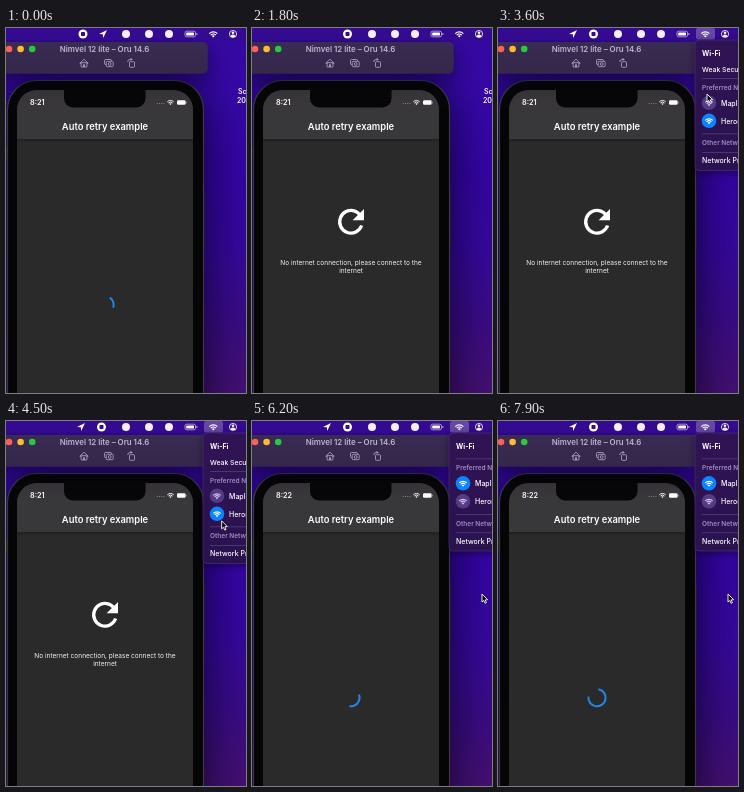
An HTML page with a canvas for the animation above (8000 ms loop, 240 px wide and 365 px high).

```html
<!DOCTYPE html>
<html lang="en">
<head>
<meta charset="utf-8">
<title>Auto retry example</title>
<style>
html, body { margin: 0; width: 100%; height: 100%; overflow: hidden; background: #330795; }
canvas { display: block; width: 240px; height: 365px; }
</style>
</head>
<body>
<canvas id="stage"></canvas>
<script>
const W = 240, H = 365, LOOP = 8000, TAU = Math.PI * 2;
const canvas = document.getElementById('stage');
const ctx = canvas.getContext('2d');
const dpr = Math.max(1, window.devicePixelRatio || 1);
canvas.width = W * dpr;
canvas.height = H * dpr;

// Moments of change, in ms
const T = { fail: 500, menu: 2950, join: 4700, minute: 4550, retry: 5980 };

function box(x, y, w, h, r, fill, stroke, lw = 1) {
  ctx.beginPath();
  ctx.roundRect(x, y, w, h, r);
  if (fill) { ctx.fillStyle = fill; ctx.fill(); }
  if (stroke) { ctx.strokeStyle = stroke; ctx.lineWidth = lw; ctx.stroke(); }
}

function shadowBox(x, y, w, h, r, fill, blur, alpha, dy = 0) {
  ctx.save();
  ctx.shadowColor = `rgba(4,0,24,${alpha})`;
  ctx.shadowBlur = blur * dpr;
  ctx.shadowOffsetY = dy * dpr;
  box(x, y, w, h, r, fill);
  ctx.restore();
}

function dot(x, y, r, fill) {
  ctx.beginPath();
  ctx.arc(x, y, r, 0, TAU);
  ctx.fillStyle = fill;
  ctx.fill();
}

function arc(x, y, r, a, b, color, lw) {
  ctx.beginPath();
  ctx.arc(x, y, r, a, b);
  ctx.strokeStyle = color;
  ctx.lineWidth = lw;
  ctx.stroke();
}

function poly(points, fill, stroke, lw = 1) {
  ctx.beginPath();
  points.forEach(([x, y]) => ctx.lineTo(x, y));
  ctx.closePath();
  if (fill) { ctx.fillStyle = fill; ctx.fill(); }
  if (stroke) { ctx.strokeStyle = stroke; ctx.lineWidth = lw; ctx.stroke(); }
}

function text(s, x, y, size, color = '#fff', weight = 400, align = 'left') {
  ctx.font = `${weight} ${size}px Inter, "Open Sans", sans-serif`;
  ctx.textAlign = align;
  ctx.textBaseline = 'alphabetic';
  ctx.fillStyle = color;
  ctx.fillText(s, x, y);
}

function fade(x0, y0, x1, y1, colors) {
  const g = ctx.createLinearGradient(x0, y0, x1, y1);
  colors.forEach((c, i) => g.addColorStop(i / (colors.length - 1), c));
  return g;
}

// Fan of arcs standing on (x, y)
function wifi(x, y, r, color = '#fff') {
  const a = -Math.PI * 0.75, b = -Math.PI * 0.25;
  for (const k of [0.92, 0.58]) arc(x, y, r * k, a, b, color, r * 0.19);
  ctx.beginPath();
  ctx.moveTo(x, y);
  ctx.arc(x, y, r * 0.34, a, b);
  ctx.fillStyle = color;
  ctx.fill();
}

const clamp = x => Math.min(1, Math.max(0, x));
const smooth = x => x * x * (3 - 2 * x);

// Cubic bezier (.4, 0, .2, 1)
function ease(x) {
  if (x <= 0) return 0;
  if (x >= 1) return 1;
  let lo = 0, hi = 1, s = 0.5;
  for (let i = 0; i < 24; i++) {
    s = (lo + hi) / 2;
    const q = 1 - s;
    if (1.2 * q * q * s + 0.6 * q * s * s + s * s * s < x) lo = s; else hi = s;
  }
  return 3 * (1 - s) * s * s + s * s * s;
}

function desktop() {
  ctx.fillStyle = fade(0, 0, 0, H, ['#3509a0', '#3407a6', '#3304a2', '#34079a', '#380b84', '#431070']);
  ctx.fillRect(0, 0, W, H);
}

function recordIcon(x) {
  dot(x, 6, 4.5, '#fff');
  box(x - 2, 4, 4, 4, 0.8, '#320a90');
}

function arrowIcon(x) {
  poly([[x + 4, 2], [x - 4, 6], [x - 0.2, 6.3], [x + 0.2, 10]], '#fff');
}

function menuBar(t) {
  ctx.fillStyle = '#340a90';
  ctx.fillRect(0, 0, W, 11.5);
  // The arrow fades out, then its neighbour closes the gap
  recordIcon(77 + 18.5 * smooth(clamp((t - 200) / 250)));
  ctx.globalAlpha = 1 - clamp((t - 50) / 200);
  arrowIcon(97);
  ctx.globalAlpha = 1;
  if (t >= T.menu) arrowIcon(75);
  for (const x of [120, 143, 163]) dot(x, 6, 4, '#f4effb');
  box(179, 3.2, 10.5, 5.6, 1.6, null, '#c5b4e2', 0.8);
  box(180.2, 4.4, 7.8, 3.2, 0.7, '#fff');
  box(190.4, 5, 1, 2, 0.5, '#c5b4e2');
  if (t >= T.menu) box(198, 0, 19, 11.5, 2, '#6648a4');
  wifi(207.3, 9.6, 6.2);
  arc(227, 6, 3.6, 0, TAU, '#fff', 0.8);
  dot(227, 4.8, 1.3, '#fff');
  ctx.beginPath();
  ctx.arc(227, 9, 2.5, Math.PI, TAU);
  ctx.fill();
}

function titleBar() {
  shadowBox(-10, 14, 211.5, 31.5, 5, '#35284c', 24, 0.6, 5);
  box(-10, 14, 211.5, 31.5, 5, fade(0, 14, 0, 46, ['#392b52', '#34274a']));
  dot(3, 21, 3.3, '#ff5f57');
  dot(14.6, 21, 3.3, '#febc2e');
  dot(26.2, 21, 3.3, '#28c840');
  text('Nimvel 12 lite – Oru 14.6', 98.5, 23.8, 7.9, '#bfb5cc', 600, 'center');

  const c = '#b5aac5', lw = 0.8;
  poly([[73.8, 35.3], [78, 31.2], [82.2, 35.3]], null, c, lw);
  box(75.1, 34.7, 5.8, 4.3, 0.3, '#37274e', c, lw);
  box(77.2, 36.2, 1.6, 2.8, 0, c);
  box(98.5, 31.5, 7, 5, 1, null, c, lw);
  box(100.2, 33.3, 7, 5.4, 1, '#37274e', c, lw);
  arc(103.7, 36, 1.4, 0, TAU, c, lw);
  box(123.5, 33.7, 5, 5.6, 0.8, null, c, lw);
  arc(124.3, 34, 2.6, -Math.PI, -Math.PI * 0.45, c, lw);
  poly([[124.5, 30], [126.8, 31.4], [124.5, 32.8]], c);
}

function phone(t) {
  shadowBox(1.5, 52.5, 196, 400, 29, '#050506', 46, 0.85, 6);
  box(196.5, 162, 2.3, 58, 1, '#211e2e');
  box(0, 118, 2, 13, 1, '#211e2e');
  box(1.5, 52.5, 196, 400, 29, '#050506', '#3a3940', 1.2);

  ctx.save();
  ctx.beginPath();
  ctx.roundRect(11, 62, 176, 400, 20);
  ctx.clip();
  ctx.fillStyle = '#2b2a2b';
  ctx.fillRect(11, 62, 176, 303);
  ctx.fillStyle = fade(0, 110, 0, 115, ['#1d1d1d', '#2b2a2b']);
  ctx.fillRect(11, 110, 176, 5);
  ctx.fillStyle = '#383739';
  ctx.fillRect(11, 62, 176, 49);
  ctx.restore();

  box(58, 58, 81.5, 21.5, [0, 0, 9, 9], '#050506');
  text(t < T.minute ? '8:21' : '8:22', 24, 76.8, 7.3, '#fff', 600);
  for (let i = 0; i < 4; i++) dot(151.3 + i * 2.2, 75.5, 0.6, '#8a898c');
  wifi(164.5, 77, 4.9);
  box(171, 72.3, 8.6, 4.4, 1.2, '#fff');
  box(180, 73.6, 0.7, 1.8, 0.3, '#aaa');
  text('Auto retry example', 99, 101.5, 9.4, '#fff', 600, 'center');

  if (t < T.fail) spinner(t + 178, -0.12);
  else if (t < T.retry) failure();
  else spinner(t - T.retry, 0.32);
}

function failure() {
  arc(99, 193.8, 11.3, 0.34, TAU - 0.72, '#fff', 3.3);
  poly([[112, 180.9], [112, 192.3], [100.6, 192.3]], '#fff');
  text('No internet connection, please connect to the', 99, 237.3, 6.56, '#f2f2f2', 400, 'center');
  text('internet', 99, 245.3, 6.56, '#f2f2f2', 400, 'center');
}

// Head runs ahead in the first half of a cycle, tail catches up in the second
function spinner(age, turn) {
  const p = (age % 1333) / 1333;
  const head = ease(p * 2), tail = ease(p * 2 - 1);
  const start = -Math.PI / 2 + tail * 1.5 * Math.PI + p * Math.PI / 2 + (age / 2222) * TAU + turn;
  const sweep = Math.max((head - tail) * 1.5 * Math.PI, 0.001);
  arc(99, 276.7, 8.6, start, start + sweep, '#2385e6', 2.1);
}

function network(name, y, on) {
  dot(211, y, 7.3, on ? '#0a84ff' : '#553b86');
  wifi(211, y + 3.4, 5.8, on ? '#fff' : '#d4c8e8');
  text(name, 223, y + 2.7, 7, '#fff', 500);
}

function wifiMenu(t) {
  if (t < T.menu) return;
  const joined = t >= T.join, d = joined ? -12.5 : 0;
  const line = y => { ctx.fillStyle = '#58457c'; ctx.fillRect(204, y, 36, 0.7); };
  shadowBox(197, 12, 60, 130.5 + d, 4, '#2d124f', 8, 0.5, 2);
  box(197, 12, 60, 130.5 + d, 4, fade(0, 12, 0, 142, ['#301354', '#2a124f']), '#503575', 0.6);
  text('Wi-Fi', 204, 28, 7, '#fff', 700);
  if (!joined) text('Weak Security', 204, 43.7, 6.8, '#fff', 500);
  line(50 + d);
  text('Preferred Network', 204, 61.8 + d, 6.5, '#9f8cc4', 600);
  network('Maple Den', 74.8 + d, joined);
  network('Heron', 92.8 + d, !joined);
  line(105.5 + d);
  text('Other Networks', 204, 117 + d, 6.5, '#9f8cc4', 600);
  line(124 + d);
  text('Network Preferences…', 204, 135 + d, 7, '#fff', 500);
}

// Stops of the pointer: time, x, y
const stops = [[1900, 246, 70], [2600, 207, 9], [3000, 207, 9], [3550, 209, 66], [4200, 209, 66], [5000, 230, 173]];

function pointer(t) {
  if (t < stops[0][0]) return;
  let [, x, y] = stops[stops.length - 1];
  for (let i = 1; i < stops.length; i++) {
    const [t0, x0, y0] = stops[i - 1], [t1, x1, y1] = stops[i];
    if (t < t1) {
      const k = smooth((t - t0) / (t1 - t0));
      x = x0 + (x1 - x0) * k;
      y = y0 + (y1 - y0) * k;
      break;
    }
  }
  const shape = [[0, 0], [0, 8], [1.8, 6.4], [3.1, 9.3], [4.4, 8.7], [3.2, 5.9], [5.6, 5.7]];
  ctx.lineJoin = 'round';
  poly(shape.map(([a, b]) => [x + a, y + b]), '#000', '#fff', 0.9);
  ctx.lineJoin = 'miter';
}

function draw(t) {
  ctx.setTransform(dpr, 0, 0, dpr, 0, 0);
  desktop();
  phone(t);
  titleBar();
  menuBar(t);
  text('Screenshot', 232, 65.5, 7, '#fff', 600);
  text('2022-01', 231, 74.5, 7, '#fff', 600);
  wifiMenu(t);
  pointer(t);
}

let begin = null;
function tick(now) {
  if (begin === null) begin = now;
  draw((now - begin) % LOOP);
  requestAnimationFrame(tick);
}
draw(0);
requestAnimationFrame(tick);
</script>
</body>
</html>
```
